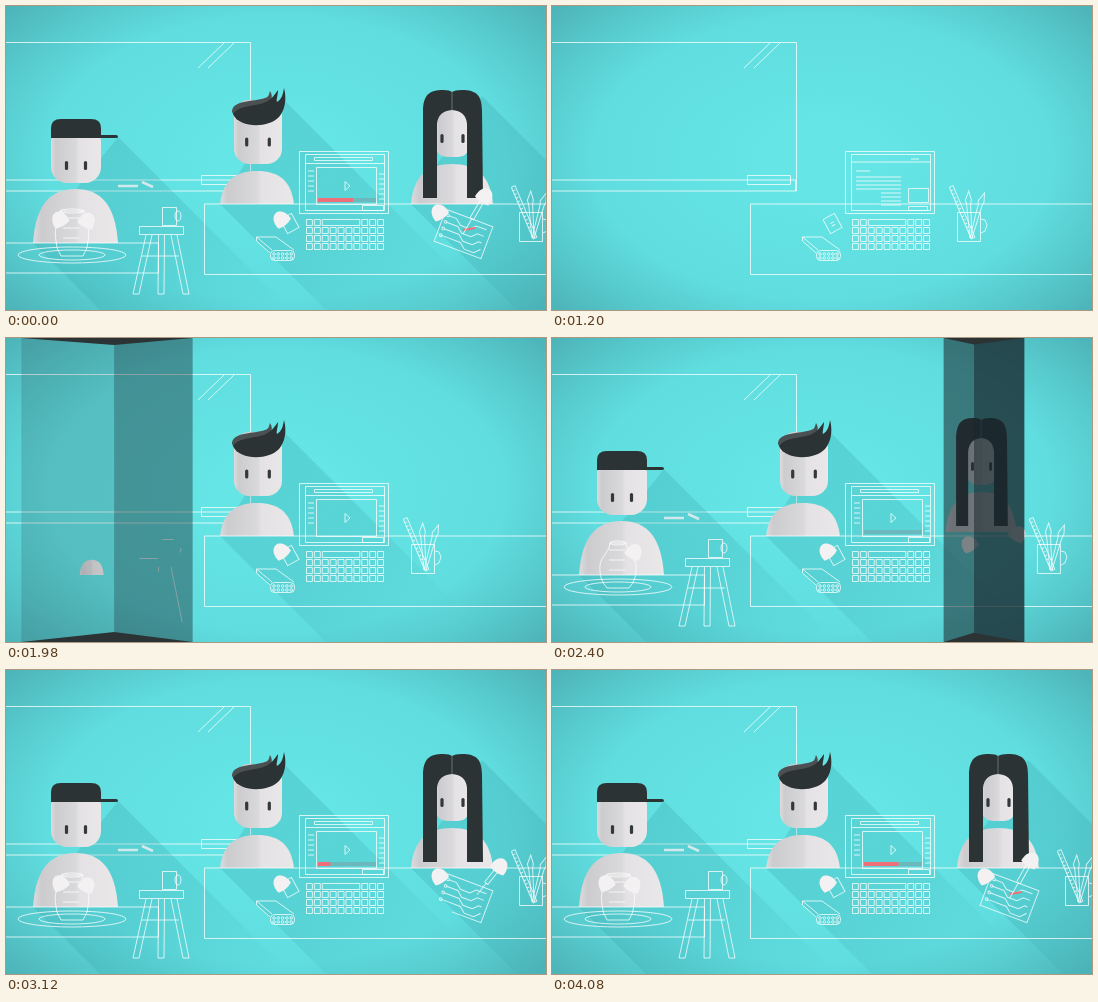
An HTML page with a canvas for the animation above (4140 ms loop, 540 by 304 pixels).

```html
<!DOCTYPE html>
<html lang="en">
<head>
<meta charset="utf-8">
<title>Three students at work</title>
<style>
html, body { margin: 0; width: 100%; height: 100%; overflow: hidden; background: #62e2e3; }
canvas { display: block; width: 100vw; height: 100vh; }
</style>
</head>
<body>
<canvas id="stage" width="540" height="304"></canvas>
<script>
const g = document.getElementById('stage').getContext('2d');
const LOOP = 4140, STEP = 60;
const DARK = '#2b3335', WHITE = 'rgba(255,255,255,.75)', RED = '#ee6f78';
let t = 0;

const mix = (a, b, u) => a + (b - a) * u;
const lin = (a, b) => Math.max(0, Math.min(1, (t - a) / (b - a)));
const ease = (a, b) => { const u = lin(a, b); return u * u * (3 - 2 * u); };
const easeOut = (a, b) => 1 - (1 - lin(a, b)) ** 2;

// Draws in a local frame
function at(x, y, angle, sx, sy, draw) {
  g.save();
  g.translate(x, y);
  g.rotate(angle);
  g.scale(sx, sy);
  draw();
  g.restore();
}

function fill(path, color) {
  g.fillStyle = color;
  g.fill(new Path2D(path));
}

// Polyline drawn up to the share p of its length
function line(pts, p = 1, color = WHITE, width = 1) {
  if (p <= 0) return;
  let len = 0;
  g.beginPath();
  g.moveTo(pts[0], pts[1]);
  for (let i = 2; i < pts.length; i += 2) {
    g.lineTo(pts[i], pts[i + 1]);
    len += Math.hypot(pts[i] - pts[i - 2], pts[i + 1] - pts[i - 1]);
  }
  g.setLineDash(p < 1 ? [len * p, len] : []);
  g.strokeStyle = color;
  g.lineWidth = width;
  g.stroke();
  g.setLineDash([]);
}

const box = (x, y, w, h, p) => line([x, y, x + w, y, x + w, y + h, x, y + h, x, y], p);

function rows(x, y, w, count, gap, p) {
  for (let i = 0; i < count; i++) line([x, y + i * gap, x + w, y + i * gap], p);
}

function oval(x, y, rx, ry, p = 1) {
  if (p <= 0) return;
  g.strokeStyle = WHITE;
  g.lineWidth = 1;
  g.beginPath();
  g.ellipse(x, y, rx, ry, 0, 0, Math.PI * 2 * p);
  g.stroke();
}

function skin(x, w) {
  const s = g.createLinearGradient(x, 0, x + w, 0);
  s.addColorStop(0, '#dddbdd');
  s.addColorStop(.1, '#cccbce');
  s.addColorStop(.5, '#d9d8da');
  s.addColorStop(.56, '#e4e2e4');
  s.addColorStop(1, '#e9e7e8');
  return s;
}

function head(x, y, w, h, eyeY, gap) {
  g.fillStyle = skin(x, w);
  g.beginPath();
  g.roundRect(x, y, w, h, w * .32);
  g.fill();
  g.fillStyle = '#34383b';
  for (const side of [-1, 1]) {
    g.beginPath();
    g.roundRect(x + w / 2 + side * gap - 1.6, eyeY - 4.5, 3.2, 9, 1.6);
    g.fill();
  }
}

function body(x, y, w, h) {
  fill(`M${x} ${y + h}C${x + w * .03} ${y + h * .3} ${x + w * .2} ${y} ${x + w / 2} ${y}S${x + w * .97} ${y + h * .3} ${x + w} ${y + h}Z`, skin(x, w));
}

function hand(x, y, angle, size = 1) {
  at(x, y, angle, size, size, () => fill('M-8 6C-9 -2 -5 -8 0 -8S9 -2 8 6Q0 9 -8 6Z', '#f3f1f1'));
}

// Long diagonal shadow of the span from (x1, y1) to (x2, y2)
function shadow(x1, y1, x2, y2, alpha) {
  if (alpha <= 0) return;
  const len = 210, s = g.createLinearGradient(x2, y1, x2 + len, y1 + len);
  s.addColorStop(0, `rgba(45,150,158,${.25 * alpha})`);
  s.addColorStop(.5, `rgba(45,150,158,${.2 * alpha})`);
  s.addColorStop(1, 'rgba(45,150,158,0)');
  fill(`M${x1} ${y1}l${len} ${len}L${x2 + len} ${y2 + len}L${x2} ${y2}Z`, s);
}

function background() {
  at(270, 152, 0, 1, .62, () => {
    const s = g.createRadialGradient(0, 0, 60, 0, 0, 370);
    s.addColorStop(0, '#65e5e5');
    s.addColorStop(.55, '#60dddf');
    s.addColorStop(.78, '#56c8cb');
    s.addColorStop(1, '#4cb1b6');
    g.fillStyle = s;
    g.fillRect(-270, -246, 540, 492);
  });
}

function board() {
  const p = ease(120, 720), q = ease(480, 960), chalk = ease(2160, 2320);
  line([0, 36.5, 244.5, 36.5, 244.5, 185, 0, 185], p);
  line([0, 174, 243.5, 174, 243.5, 185], q);
  box(195.5, 169.5, 43, 9, q);
  for (const x of [218, 228]) line([x, 37, x - 26, 62], q);
  line([112, 180, 132, 180], chalk, '#fff', 2.5);
  line([136, 176, 147, 181], chalk, '#fff', 2.5);
}

function documentPage(p) {
  line([299, 156, 379, 156], p);
  line([359, 153, 367, 153], p);
  line([304, 165, 318, 165], p);
  rows(304, 171, 45, 4, 4, p);
  rows(329, 187, 20, 4, 4, p);
  box(356.5, 182.5, 20, 14, p);
  box(356.5, 200.5, 19, 4, p);
}

function videoPage(p) {
  line([299, 157.5, 379, 157.5], p);
  box(308.5, 151.5, 58, 3, p);
  box(310.5, 161.5, 60, 37, p);
  box(356.5, 199.5, 21, 5, p);
  rows(302, 165, 6, 5, 5, p);
  rows(373, 168, 5, 6, 5, p);
  line([339, 175.5, 344, 180, 339, 184.5, 339, 175.5], p);
  g.fillStyle = `rgba(120,165,170,${.6 * ease(2100, 2400)})`;
  g.fillRect(312, 192, 58, 4);
  g.fillStyle = RED;
  g.fillRect(312, 192, 35 * lin(2580, 4100), 4);
}

function computer() {
  const p = ease(420, 960);
  box(293.5, 145.5, 89, 62, p);
  box(299.5, 148.5, 79, 56, p);
  if (t < 1740) documentPage(ease(700, 1140));
  else videoPage(ease(1740, 1920));
}

// Four rows of keys; the wide key takes the place of several
function keyboard() {
  const p = ease(600, 1140), pitch = 7.9;
  for (let row = 0; row < 4; row++)
    for (let i = 0; i < 10; i++) {
      if (row === 0 && i > 2 && i < 7) continue;
      const span = row === 0 && i === 2 ? 5 : 1;
      box(300.5 + i * pitch, 213.5 + row * 8, span * pitch - 2, 6, p);
    }
}

function notebook() {
  const p = ease(600, 1080);
  line([264, 247, 250.5, 235, 250.5, 231, 270, 231, 288, 244], p);
  line([250.5, 231, 266, 244], p);
  if (p <= 0) return;
  g.globalAlpha = p;
  g.beginPath();
  g.roundRect(264.5, 244.5, 24, 10, 4);
  g.stroke();
  for (let i = 0; i < 10; i++) oval(268 + (i >> 1) * 4.3, 248 + i % 2 * 4, 1.3, 1.3);
  g.globalAlpha = 1;
}

function mug() {
  const p = ease(660, 1080), grab = ease(1620, 1860);
  at(mix(280.5, 283.5, grab), 217.5, -.5, 1, 1, () => {
    box(-6.5, -8, 13, 16, p);
    rows(-2, -1, 4, 2, 3, p * (1 - grab));
  });
  hand(mix(258, 275, grab), mix(202, 213, grab), -.7, grab);
}

function pens() {
  const p = ease(660, 1140);
  at(108 * easeOut(2200, 2608), 0, 0, 1, 1, () => {
    box(405.5, 206.5, 23, 29, p);
    line([429, 213, 433, 214, 435, 219, 433, 225, 429, 227], p);
    at(421, 232, -.4, 1, 1, () => {
      box(-2, -56, 4, 56, p);
      rows(-2, -52, 2.5, 12, 4, p);
    });
    for (const lean of [-.07, .27])
      at(419, 232, lean, 1, 1, () => line([-1, 0, -2, -34, -3, -38, 1, -47, 3, -38, 2, -34, 1, 0], p));
  });
}

function desk() {
  line([540, 198, 198.5, 198, 198.5, 268.5, 540, 268.5], ease(240, 960));
  computer();
  keyboard();
  notebook();
  mug();
  pens();
}

function middleStudent() {
  const p = ease(1200, 1620);
  if (p <= 0) return;
  shadow(278, 94, 214, 198, ease(1320, 1680));
  g.save();
  g.beginPath();
  g.rect(190, 0, 200, 198);
  g.clip();
  g.translate(0, 125 * (1 - p));
  body(214, 165, 74, 34);
  head(228, 94, 48, 64, 136, 11.3);
  fill('M226 106C226 94 247 96 259 92C263 91 263 88 264 85C268 91 265 97 259 104L231 114Z', '#4b5052');
  fill('M227 108C235 98 250 101 260 96C266 93 269 88 272 84C272 89 270 94 271 96C276 93 277 88 278 82C281 93 279 104 273 111C263 122 234 123 227 108Z', DARK);
  g.restore();
}

function capStudent() {
  const p = ease(1840, 2240), rise = ease(1960, 2260);
  if (p <= 0) return;
  shadow(112, 131, 27, 237, ease(2100, 2340));
  at(mix(92, 70, p), 237, 0, p, p, () => {
    body(-43, -54, 85, 54);
    at(0, -54, 0, rise, rise, () => {
      head(-25, -63, 50, 57, -23.5, 9.5);
      fill('M-25 -51V-61Q-25 -70 -15 -70H15Q25 -70 25 -61V-54H40Q42 -54 42 -52.5T40 -51Z', DARK);
    });
  });
}

function stool() {
  const p = ease(1900, 2200);
  box(133.5, 220.5, 44, 8, p);
  box(156.5, 201.5, 14, 18, p);
  oval(172, 210, 3, 5, p);
  line([136, 250, 173, 250], ease(2050, 2250));
  for (let i = 0; i < 3; i++) {
    const top = 140 + 12.5 * i, foot = 127 + 25 * i;
    line([top, 229, foot, 288, foot + 6, 288, top + 6, 229], ease(2040 - 90 * i, 2300 - 90 * i));
  }
}

function pottery() {
  const p = ease(2160, 2360);
  stool();
  line([0, 237, 152.5, 237, 152.5, 267, 0, 267], p);
  oval(66, 249, 54, 8, p);
  oval(66, 249, 33, 5, p);
  if (p < 1) return;

  const w = 17 + Math.sin(t / 170), neck = mix(8, 12, lin(2360, 3540));
  at(66, 250, 0, 1, 1, () => {
    g.strokeStyle = WHITE;
    g.stroke(new Path2D(`M${-neck} -45C${-neck} -35 ${-w - 2} -31 ${-w} -17Q${-w} -8 -11 0H11Q${w} -8 ${w} -17C${w + 2} -31 ${neck} -35 ${neck} -45Z`));
    oval(0, -45, neck, 2);
    rows(-9, -38, 18, 3, 10, .9);
  });
  const sway = Math.sin(t / 150), come = ease(2420, 2700);
  hand(82 - sway, 214 + sway, .5);
  hand(mix(38, 53, come) + sway, 214 - sway, -.5, come);
  if (t > 3400 && t < 3700) line([85, 215, 90, 214], 1, RED, 2);
}

function longHairStudent() {
  const u = lin(2230, 2500), turn = easeOut(2230, 2500);
  if (u <= 0) return;
  shadow(476, 90, 405, 198, ease(2460, 2700));
  at(447 - 46 * (1 - u), -30 * (1 - turn), 0, turn, 1, () => {
    body(-42, 158, 82, 40);
    head(-17, 90, 33, 61, 132.5, 10.5);
    fill('M-30 192V106C-30 88 -23 84 -10 84Q-3 84 -1 86Q2 84 9 84C23 84 29 89 29 105L30 192H14V118Q13 105 -1 104Q-15 105 -16 118V192Z', DARK);
    line([-1, 86, -1, 104], 1, '#7c8284', .8);
  });
}

function circuit() {
  const p = ease(2520, 2800);
  at(457.5, 228, .36, 1, 1, () => {
    box(-25, -17, 50, 34, ease(2820, 3300));
    for (let i = 0; i < 4; i++) {
      const y = -12 + i * 7, bend = -12 + i * 4;
      line([-20, y, bend, y, bend + 6, y + 5, bend + 16, y + 5, bend + 21, y, 20, y], p);
      oval(-21, y, 1.3, 1.3, p);
    }
  });
}

// The hands hold the card and guide a pen that leaves a red trace
function drawingHands() {
  const come = ease(2220, 2400), back = ease(3300, 4140);
  const hx = mix(466, 494, ease(2400, 2740)) - 15 * back, hy = 196 - 6 * back;
  const tx = 476 - 19 * lin(2760, 4140), ty = 222 + 6 * lin(2760, 3540);
  line([tx, ty - 4, tx + 12, ty - 6], lin(3240, 3500), RED, 2);
  if (t > 2540) {
    const angle = Math.atan2(hy - ty, hx - tx), reach = Math.hypot(hx - tx, hy - ty);
    at(tx, ty, angle, 1, 1, () => {
      line([0, 0, reach * .4, 0]);
      box(reach * .4, -2, reach * .5, 4);
    });
  }
  hand(hx, hy, .6, come);
  hand(mix(417, 433, ease(2400, 2560)), 206, -.6, come);
}

// Turning glass booth with its far corner in the middle
function booth(start, end, mid, half, tint) {
  if (t <= start || t >= end) return;
  const u = lin(start, end), swing = Math.sin(Math.PI * u), w = half * Math.sqrt(swing);
  const l = mid - w, r = mid + w, c = mix(l, r, u), depth = 10 * swing;
  fill(`M${l} 0H${c}V304H${l}Z`, `rgba(24,38,44,${tint})`);
  fill(`M${c} 0H${r}V304H${c}Z`, `rgba(24,38,44,${tint + .24})`);
  fill(`M${l} 0L${c} ${depth * .7}L${r} 0Z`, DARK);
  fill(`M${l} 304L${c} ${304 - depth}L${r} 304Z`, DARK);
}

function draw(now) {
  t = Math.floor(now % LOOP / STEP) * STEP;
  if (t < STEP) t += LOOP;
  background();
  board();
  middleStudent();
  capStudent();
  longHairStudent();
  desk();
  pottery();
  circuit();
  drawingHands();
  booth(1720, 2200, 101, 86, .17);
  booth(2220, 2700, 432, 42, .54);
  requestAnimationFrame(draw);
}
requestAnimationFrame(draw);
</script>
</body>
</html>
```
